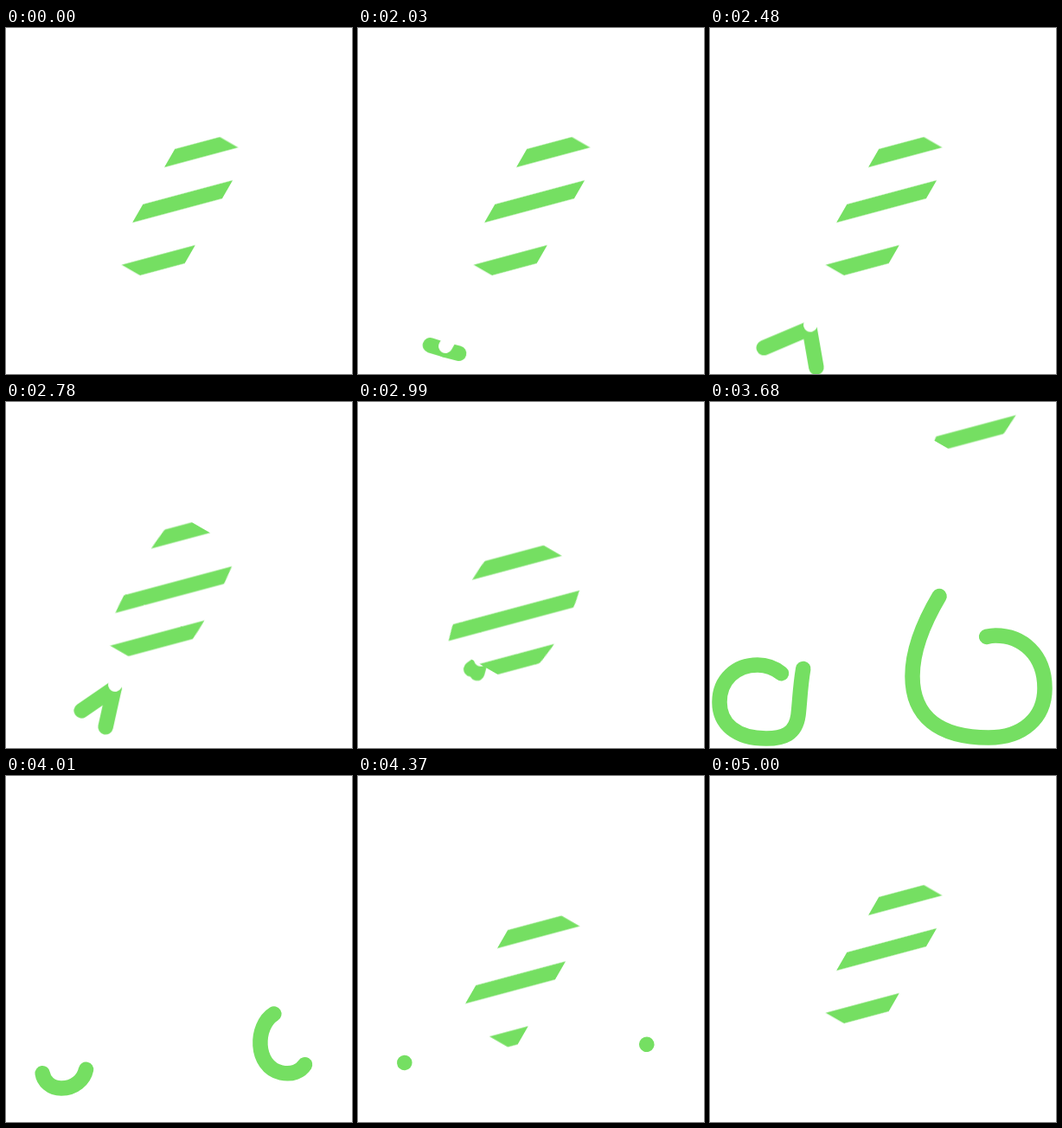
An HTML page without scripts that plays this animation: 400x400 px, repeating every 5.03 s.

```html
<!DOCTYPE html>
<html lang="en">
<head>
<meta charset="utf-8">
<title>Striped rocket</title>
<style>
html, body { margin: 0; width: 100%; height: 100%; overflow: hidden; background: #fff; }
svg { display: block; width: 100vw; height: 100vh; }
.a { animation: 5.03s linear infinite; }

.green { fill: none; stroke: #75df62; stroke-width: 17.2; }
.round { stroke-linecap: round; stroke-width: 17.5; }
.fuse { stroke: #fff; stroke-width: 16; stroke-linecap: round; }

/* body outline: squash, launch, landing */
.body { animation-name: body; }
@keyframes body {
  0%, 50.5%, 99.4%, 100% { d: path("M-38 -14.4H38Q38 78 38 170.2H-38Q-38 78 -38 -14.4Z"); }
  55.27% { d: path("M-41 12.8H41Q55 95 41 183.7H-41Q-55 95 -41 12.8Z"); }
  64.81% { d: path("M-54 66H54Q96 134 54 202.4H-54Q-96 134 -54 66Z"); }
  67.2% { d: path("M-57 72H57Q101 139 57 206H-57Q-101 139 -57 72Z"); animation-timing-function: ease-in; }
  71.97% { d: path("M-33 -105H33Q41 -5 33 95H-33Q-41 -5 -33 -105Z"); }
  73.16% { d: path("M-30 -290H30Q45 -188 30 -87H-30Q-45 -188 -30 -290Z"); }
  74.35% { d: path("M-30 -500H30Q45 -405 30 -310H-30Q-45 -405 -30 -500Z"); }
  79.92% { d: path("M-38 -480H38Q38 -390 38 -300H-38Q-38 -390 -38 -480Z"); }
  83.3% { d: path("M-38 10H38Q38 101 38 192H-38Q-38 101 -38 10Z"); }
  86.88% { d: path("M-38 22.4H38Q38 103 38 184.7H-38Q-38 103 -38 22.4Z"); }
  94.04% { d: path("M-38 -6H38Q38 84 38 175H-38Q-38 84 -38 -6Z"); animation-timing-function: ease-out; }
}

.stripes { animation-name: stripes; }
@keyframes stripes {
  0%, 50.5%, 99.4%, 100% { transform: translateY(0); }
  55.27% { transform: translateY(92.3px); }
  64.81% { transform: translateY(175px); }
  67.2% { transform: translateY(180px); animation-timing-function: ease-in; }
  71.97% { transform: translateY(68px); }
  73.16% { transform: translateY(-108.8px); }
  74.35% { transform: translateY(-320px); }
  79.92% { transform: translateY(-441px); }
  83.3% { transform: translateY(50px); }
  86.88% { transform: translateY(44.1px); }
  94.04% { transform: translateY(8px); animation-timing-function: ease-out; }
}

/* sparks climbing the fuse */
.flame { animation-name: climb, lit; }
@keyframes climb {
  0%, 40.34% { transform: translate(100px, 372px); }
  55.27% { transform: translate(125px, 331px); }
  60.83%, 100% { transform: translate(146px, 292px); }
}
@keyframes lit {
  0%, 40.33%, 60.84%, 100% { opacity: 0; }
  40.34%, 60.83% { opacity: 1; }
}
.left { animation-name: left; }
@keyframes left {
  0%, 40.34% { d: path("M0 0L-16 -5"); }
  42.74% { d: path("M0 0L-55 -18"); }
  45.73% { d: path("M0 0L-58 5"); }
  50.5% { d: path("M0 0L-51 28"); }
  55.27% { d: path("M0 0L-38 26"); }
  60.83%, 100% { d: path("M0 0L-1 1"); }
}
.right { animation-name: right; }
@keyframes right {
  0%, 40.34% { d: path("M0 0L16 4"); }
  42.74% { d: path("M0 0L48 22"); }
  45.73% { d: path("M0 0L38 36"); }
  50.5% { d: path("M0 0L-2 48"); }
  55.27% { d: path("M0 0L-10 45"); }
  60.83%, 100% { d: path("M0 0L-1 1"); }
}

/* curling trails */
.trails { animation-name: show; }
@keyframes show {
  0%, 67.59%, 89.01%, 100% { opacity: 0; }
  67.6%, 89% { opacity: 1; }
}
.curl1 { animation-name: curl1, shrink; }
@keyframes curl1 {
  0%, 67.6% { stroke-dasharray: .1 1999; stroke-dashoffset: 0; }
  71.97% { stroke-dasharray: 275 1999; stroke-dashoffset: -15; }
  73.16% { stroke-dasharray: 282 1999; stroke-dashoffset: -82.6; animation-timing-function: ease-out; }
  83.3% { stroke-dasharray: 25 1999; stroke-dashoffset: -458; }
  86.8%, 100% { stroke-dasharray: .1 1999; stroke-dashoffset: -484; }
}
.curl2 { animation-name: curl2, shrink; }
@keyframes curl2 {
  0%, 67.6% { stroke-dasharray: .1 1999; stroke-dashoffset: 0; }
  71.97% { stroke-dasharray: 355 1999; stroke-dashoffset: -10; }
  73.16% { stroke-dasharray: 430 1999; stroke-dashoffset: -68; animation-timing-function: ease-out; }
  83.3% { stroke-dasharray: 50 1999; stroke-dashoffset: -600; }
  86.8%, 100% { stroke-dasharray: .1 1999; stroke-dashoffset: -657; }
}
@keyframes shrink {
  0%, 86.95% { stroke-width: 17.5px; }
  89%, 100% { stroke-width: 0; }
}
</style>
</head>
<body>
<svg viewBox="0 0 400 400">
  <defs>
    <clipPath id="hull">
      <path class="a body" d="M-38 -14.4H38Q38 78 38 170.2H-38Q-38 78 -38 -14.4Z"/>
    </clipPath>
    <path id="pair" d="M-120 117.8L120 -122.2M-120 191.6L120 -48.4"/>
  </defs>

  <g class="a trails green round">
    <path class="a curl1" d="M118 225L108 307C104 330 104 345 102 362C99 384 85 389 65 389C30 389 11 372 11 347C11 321 30 304 55 304C66 304 76 308 84 315C103 332 90 361 64 361C46 361 37 343 45 333C49 328 56 330 56 337"/>
    <path class="a curl2" d="M300 164L266 223C245 258 234 288 234 317C234 363 264 388 322 388C362 388 387 365 387 331C387 292 361 270 330 270C325 270 321 271 317 272C288 279 284 335 318 343C340 348 354 330 346 316C342 309 331 307 330 315.5"/>
  </g>

  <g class="a flame">
    <path class="a left green round" d="M0 0L-16 -5"/>
    <path class="a right green round" d="M0 0L16 4"/>
    <path class="fuse" d="M1 -4L40 -72"/>
  </g>

  <g transform="rotate(30) translate(277)">
    <g clip-path="url(#hull)">
      <rect x="-150" y="-600" width="300" height="1000" fill="#fff"/>
      <g class="a stripes green">
        <use href="#pair" y="-320.6"/>
        <use href="#pair" y="-160.3"/>
        <use href="#pair"/>
        <use href="#pair" y="160.3"/>
        <use href="#pair" y="320.6"/>
      </g>
    </g>
  </g>
</svg>
</body>
</html>
```
